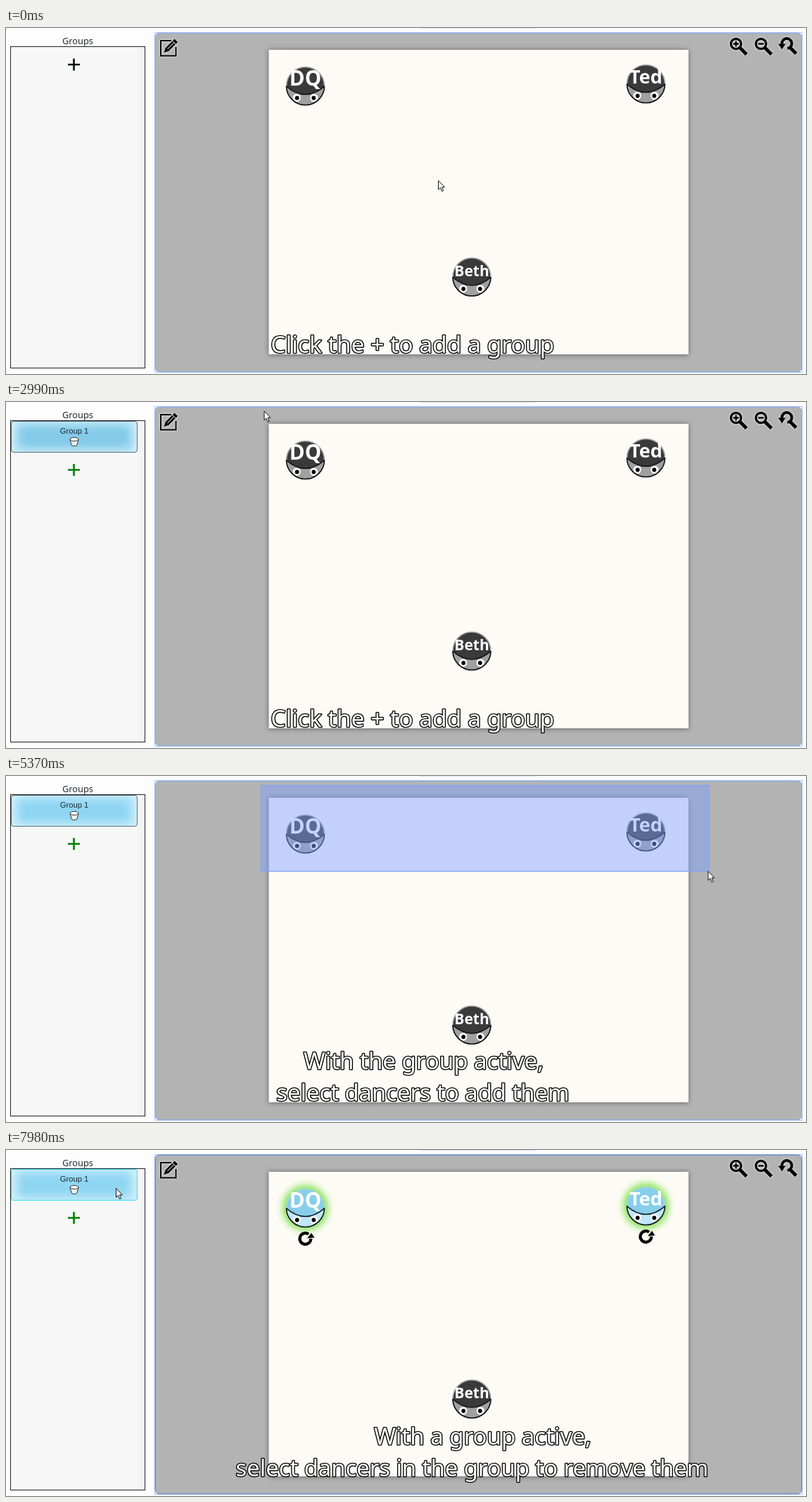
Recreate the animation shown at these times as an HTML page. Size 1137 px wide and 492 px high, loop 8 s.

```html
<!DOCTYPE html>
<html lang="en">
<head>
<meta charset="utf-8">
<title>Groups</title>
<style>
  html, body { margin: 0; width: 100%; height: 100%; overflow: hidden; background: #fdfdfd; }
  svg { display: block; width: 100%; height: 100%; }
  .ui { font-family: "Noto Sans", "Open Sans", sans-serif; text-anchor: middle; }
  .name { font-weight: 700; fill: #fff; }
  .caption { fill: #fff; stroke: #000; stroke-width: 2.7; stroke-linejoin: round; paint-order: stroke; }
  .icon { fill: none; stroke: #000; }
  .halo { filter: drop-shadow(0 0 1.5px #fff); }
  .solid { fill: #000; stroke: none; }
</style>
</head>
<body>
<svg viewBox="0 0 1137 492">
  <defs>
    <filter id="soft" x="-20%" y="-80%" width="140%" height="260%"><feGaussianBlur stdDeviation="7"/></filter>
    <filter id="glow" x="-50%" y="-50%" width="200%" height="200%"><feGaussianBlur stdDeviation="5.5"/></filter>
    <filter id="shade" x="-5%" y="-5%" width="110%" height="110%"><feGaussianBlur stdDeviation="3.5"/></filter>
    <clipPath id="card"><rect x="7" y="27" width="180" height="45" rx="4"/></clipPath>
    <clipPath id="face"><circle r="27"/></clipPath>
  </defs>

  <path d="M588 0H753" stroke="#d3daf0" stroke-width="1.5"/>

  <!-- group list -->
  <text class="ui" x="102" y="23" font-size="12.8" fill="#222b33">Groups</text>
  <rect x="6.5" y="26.5" width="191" height="457" fill="#f7f7f7" stroke="#222"/>
  <rect x="187" y="27" width="10" height="456" fill="#f4f4f4"/>
  <g id="group">
    <g clip-path="url(#card)">
      <rect x="7" y="27" width="180" height="45" fill="#d4f0fb"/>
      <rect id="tint" x="15" y="31" width="164" height="37" filter="url(#soft)"/>
    </g>
    <rect id="cardEdge" x="7.5" y="27.5" width="179" height="44" rx="3.5" fill="none"/>
    <text x="97" y="45" font-size="11.2" text-anchor="middle" fill="#1d2a30" font-family="Arial, 'Liberation Sans', sans-serif">Group 1</text>
    <path d="M91 53.5L93 60.5Q93.5 62.5 95.5 62.5H98.5Q100.5 62.5 101 60.5L103 53.5Z" fill="#eef2f3" stroke="#333"/>
    <ellipse cx="97" cy="53" rx="6" ry="2.6" fill="#fff" stroke="#333"/>
  </g>
  <rect id="focus" x="81.5" y="27.5" width="30" height="45" rx="2" fill="none" stroke="#78a2ee"/>
  <path id="plus" d="M-8.5 0H8.5M0 -8.5V8.5" stroke-width="2.6"/>

  <!-- stage -->
  <rect id="outline" x="211.5" y="6.5" width="920" height="483" fill="none" stroke="#a9c5f5"/>
  <rect id="panel" x="212" y="7" width="919" height="482" rx="6" fill="#b3b3b3"/>
  <rect x="373" y="31" width="597" height="434" fill="#000" opacity=".4" filter="url(#shade)"/>
  <rect x="373.5" y="31" width="596.5" height="433" fill="#fefbf6"/>
  <g id="dancers"></g>

  <g id="tools" class="icon halo">
    <path d="M235 18H220V39.5H241.5V27" stroke-width="1.9"/>
    <path class="solid" d="M224.5 35L226.5 28.5L239.5 15.5L244 20L231 33Z"/>
    <path d="M236.5 18.5L241 23M229.5 30L238 21.5" stroke="#b3b3b3" stroke-width="1.1"/>
    <g id="plusLens"></g>
    <g id="minusLens"></g>
    <path d="M1102.8 23A7 7 0 1 1 1110.5 29" stroke-width="4"/>
    <path class="solid" d="M1097.5 22.5H1108L1102.8 30.5Z"/>
    <path d="M1114 27.5L1123 36.5" stroke-width="5"/>
  </g>

  <rect id="lasso" x="362.5" y="13.5" fill="rgb(126,159,255)" fill-opacity=".47" stroke="#86a2f2" stroke-width="1.4"/>
  <g id="captions"></g>
  <path id="cursor" d="M0 0V12.8L2.9 10.1L5 15.2L7.1 14.3L5 9.3H8.9Z" fill="#fff" stroke="#111" stroke-width="1"/>
</svg>
<script>
const LOOP = 8000, STEP = 77;
const $ = id => document.getElementById(id);
const show = (el, on) => el.style.display = on ? '' : 'none';
const set = (el, attrs) => { for (const k in attrs) el.setAttribute(k, attrs[k]); };

// Magnifier icons
function lens(x, sign) {
  return `<g transform="translate(${x} 22.5)">
    <circle r="7.2" stroke-width="3.3"/>
    <path d="M5.5 5.5L15 15" stroke-width="5"/>
    <path d="${sign}" stroke-width="2.3"/></g>`;
}
$('plusLens').innerHTML = lens(1037.5, 'M-4 0H4M0 -4V4');
$('minusLens').innerHTML = lens(1073, 'M-4 0H4');

// Dancers: name, centre, font size, baseline offset, joins the group
const crew = [
  ['DQ', 425.5, 82.5, 29.5, -.5, true],
  ['Ted', 909.5, 79.5, 27, -.5, true],
  ['Beth', 662, 354, 21, -1, false]
];

function dancer([name, x, y, size, dy], picked) {
  const cap = picked ? '#87ceeb' : '#3a3a3a';
  const skin = picked ? '#bfe6fa' : '#a0a0a0';
  const eye = ex => `<circle cx="${ex}" cy="16.8" r="5.6" fill="#fff"/><circle cx="${ex + (ex < 0 ? .5 : -.5)}" cy="17" r="2.9"/>`;
  return `<g transform="translate(${x} ${y})">
    ${picked ? '<circle r="32" fill="#7be04a" filter="url(#glow)"/>' : ''}
    <circle r="27" fill="${cap}" stroke="${picked ? '#a6dcc8' : '#aaa'}" stroke-width="1.6"/>
    <g clip-path="url(#face)">
      <path d="M-27.5 0Q0 24 27.5 0V28H-27.5Z" fill="${skin}" stroke="#111" stroke-width="1.5"/>
      ${eye(-12.3)}${eye(12.3)}
    </g>
    <path d="M-27 0A27 27 0 0 0 27 0" fill="none" stroke="#111" stroke-width="1.6"/>
    <text class="ui name" y="${dy}" font-size="${size}">${name}</text>
    ${picked ? `<g transform="translate(0 43.5)"><path class="icon" d="M4.5 -6.3A7.9 7.9 0 1 0 7.8 0" stroke-width="4.2"/>
      <path class="solid" d="M2.5 -.5L13 -1.5L8.5 -8Z"/></g>` : ''}
  </g>`;
}
const drawCrew = picked => crew.map(d => dancer(d, picked && d[5])).join('');
$('dancers').innerHTML = `<g id="plain">${drawCrew(false)}</g><g id="picked">${drawCrew(true)}</g>`;

// Captions: start time, then lines of text, centre, baseline, font size
const captions = [
  [0, ['Click the + to add a group', 577.8, 462, 33.6]],
  [4060, ['With the group active,', 593.5, 417, 33], ['select dancers to add them', 592.5, 462, 32.75]],
  [7890, ['With a group active,', 677.5, 419, 33], ['select dancers in the group to remove them', 662.5, 464, 32.75]]
];
$('captions').innerHTML = captions.map(([, ...lines]) => '<g>' + lines.map(([s, x, y, size]) =>
  `<text class="ui caption" x="${x}" y="${y}" font-size="${size}">${s}</text>`).join('') + '</g>').join('');

// Cursor legs: start, end, steps, target
const legs = [
  [270, 500, 4, 112, 145],
  [750, 1210, 7, 100, 63],
  [1370, 1440, 2, 99.5, 58],
  [2060, 2600, 8, 471, 62],
  [2680, 2990, 5, 367, 13],
  [4060, 4600, 8, 727, 93],
  [4750, 5289, 8, 998, 135.5],
  [5980, 6440, 7, 673, 220],
  [6520, 6750, 4, 245, 115],
  [6910, 7130, 4, 156.5, 54.5]
];
function cursorAt(t) {
  let x = 614.5, y = 217;
  for (const [start, end, n, tx, ty] of legs) {
    if (t < start) break;
    const k = Math.min(n, Math.floor((t - start) / (end - start) * (n - 1) + 1e-6) + 1);
    x += (tx - x) * k / n;
    y += (ty - y) * k / n;
  }
  return [x, y];
}

function draw(t) {
  const [x, y] = cursorAt(t);
  const added = t >= 1900, drag = t >= 4060 && t < 5450, picked = t >= 5450;
  const late = t >= 6910, focused = x > 212 || late;
  set($('cursor'), { transform: `translate(${x} ${y})` });

  show($('group'), added);
  show($('focus'), t >= 1820 && !added);
  set($('plus'), { transform: `translate(96.5 ${added ? 96.5 : 52})`, stroke: added ? '#008000' : t < 1370 ? '#081408' : '#062806' });
  set($('tint'), { fill: drag || t >= 7130 ? '#8fd6f3' : '#83cbe9' });
  const hover = added && x < 187 && y < 72;
  set($('cardEdge'), { stroke: hover ? '#35dff2' : '#5d7078' });

  set($('panel'), { stroke: late ? '#5079c8' : focused ? '#82a9ee' : '#3a3a3a' });
  show($('outline'), focused);
  show($('tools'), !drag);
  show($('plain'), !picked);
  show($('picked'), picked);

  // The selection box trails the cursor by one step
  const [lx, ly] = cursorAt(t - STEP);
  show($('lasso'), drag && t >= 4060 + STEP);
  set($('lasso'), { width: Math.max(0, lx - 361.5), height: Math.max(0, ly - 13.5) });

  const current = captions.filter(c => t >= c[0]).length - 1;
  [...$('captions').children].forEach((el, i) => show(el, i === current));
}

const began = performance.now();
function tick(now) {
  draw(Math.max(0, now - began) % LOOP);
  requestAnimationFrame(tick);
}
draw(0);
requestAnimationFrame(tick);
</script>
</body>
</html>
```
